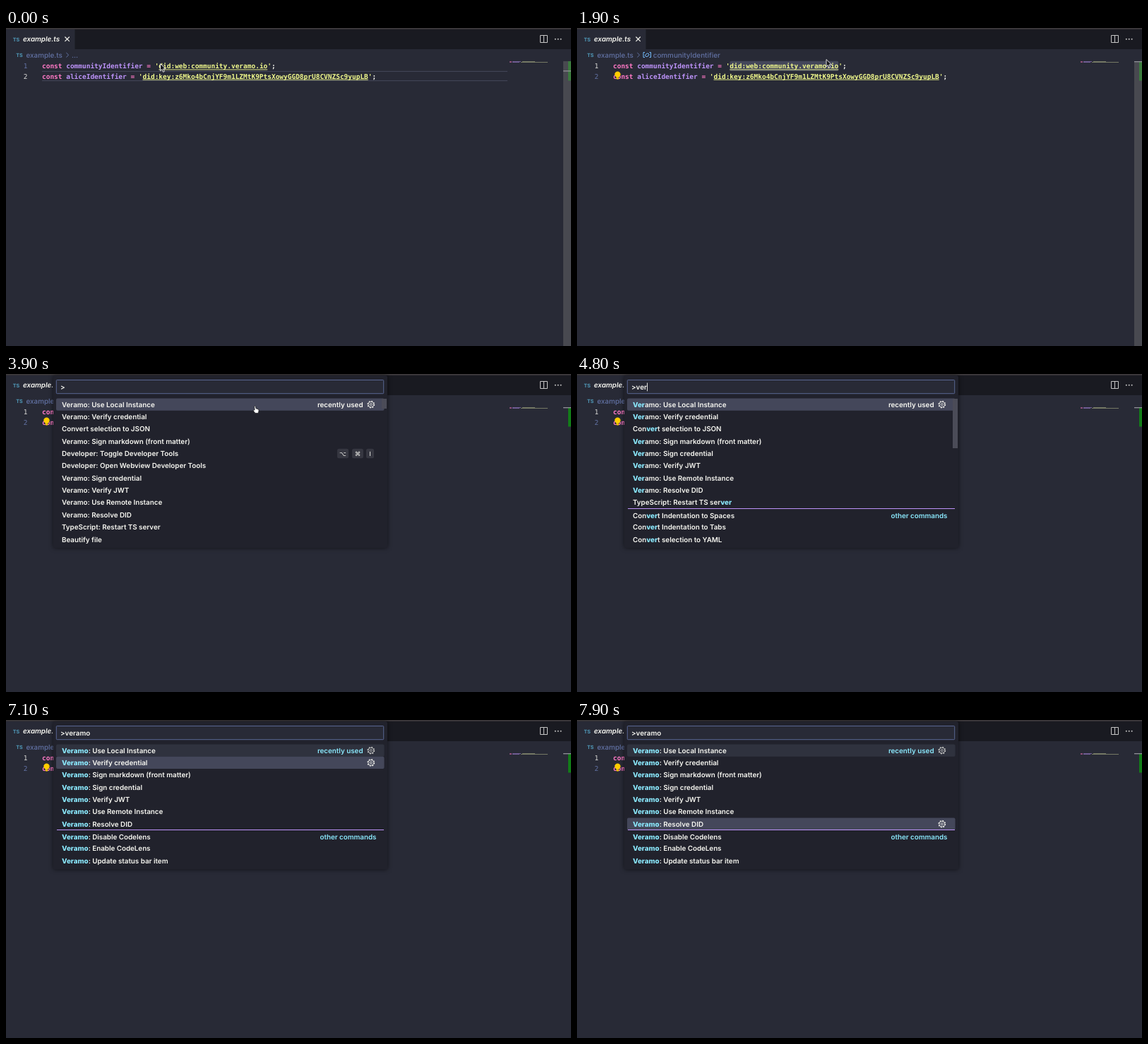
An HTML page that plays this animation: 800 by 450 pixels, repeating every 8000 ms.

```html
<!DOCTYPE html>
<html lang="en">
<head>
<meta charset="utf-8">
<title>Command palette</title>
<style>
html, body { margin: 0; width: 100%; height: 100%; overflow: hidden; background: #282a36; }
svg { display: block; width: 100vw; height: 100vh; }
text { white-space: pre; text-rendering: geometricPrecision; font: 600 9.8px Inter, sans-serif; fill: #f8f8f2; }
.code { font: 700 9.47px "DejaVu Sans Mono", monospace; }
.icon { font-weight: 700; font-size: 7.2px; fill: #519aba; }
.tab { font-style: italic; }
.dim { fill: #6272a4; font-weight: 500; font-size: 9.9px; }
.hit { fill: #8be9fd; font-weight: 800; }
.group { fill: #8be9fd; }
.keycap { font: 8.5px "DejaVu Sans", sans-serif; text-anchor: middle; }
.end { text-anchor: end; }
.line { fill: none; stroke: #f8f8f2; }
.shadow { filter: drop-shadow(0 0 3px rgba(0, 0, 0, .6)); }
</style>
</head>
<body>
<svg id="stage" viewBox="0 0 800 450"></svg>
<script>
const LOOP = 8000, STEP = 100;
const CHAR = 5.7, CODE_X = 51, LINE_H = 14.2, CODE_TOP = 46.7;
const ROW_H = 17.35, LIST_TOP = 34.4, MAX_ROWS = 12;
const OPEN = 2900, DRAG = 300;

const recent = [
  'Veramo: Use Local Instance', 'Veramo: Verify credential', 'Convert selection to JSON',
  'Veramo: Sign markdown (front matter)', 'Developer: Toggle Developer Tools',
  'Developer: Open Webview Developer Tools', 'Veramo: Sign credential', 'Veramo: Verify JWT',
  'Veramo: Use Remote Instance', 'Veramo: Resolve DID', 'TypeScript: Restart TS server', 'Beautify file'
];
const others = [
  'Convert Indentation to Spaces', 'Convert Indentation to Tabs', 'Convert selection to YAML',
  'Veramo: Disable Codelens', 'Veramo: Enable CodeLens', 'Veramo: Update status bar item'
];
const source = [
  ['communityIdentifier', 'did:web:community.veramo.io'],
  ['aliceIdentifier', 'did:key:z6Mko4bCnjYF9m1LZMtK9PtsXowyGGD8prU8CVNZSc9yupLB']
];
const query = 'veramo';
const keyTimes = [4500, 4600, 4700, 4900, 5200, 5400];
const downTimes = [7000, 7200, 7400, 7600, 7700, 7800];
const thumbHeights = [14, 20, 30, 70];
const pointerPath = [[0, 218.5, 50.5], [200, 216.5, 50.5], [DRAG, 216.5, 50.5],
  [1300, 371, 50.5], [1700, 371, 50.5], [1900, 353, 44.5]];

const escape = s => s.replace(/&/g, '&amp;').replace(/</g, '&lt;').replace(/>/g, '&gt;');
const rect = (x, y, w, h, fill, extra = '') =>
  `<rect x="${x}" y="${y}" width="${w}" height="${h}" fill="${fill}" ${extra}/>`;
const path = (d, extra = '') => `<path class="line" d="${d}" ${extra}/>`;
const text = (x, y, s, cls = '', extra = '') =>
  `<text x="${x}" y="${y}" class="${cls}" ${extra}>${escape(s)}</text>`;
const passed = (times, t) => times.filter(k => t >= k).length;
const stringStart = name => CODE_X + (name.length + 10) * CHAR;

function pointerAt(t) {
  const i = pointerPath.findIndex(p => p[0] > t);
  if (i < 0) return pointerPath.at(-1).slice(1);
  const [a, b] = [pointerPath[i - 1], pointerPath[i]];
  const k = (t - a[0]) / (b[0] - a[0]);
  return [a[1] + (b[1] - a[1]) * k, a[2] + (b[2] - a[2]) * k];
}

function header(t) {
  const symbol = t >= 1000
    ? path('M96 34.5H94V41.5H96M102.5 34.5H104.5V41.5H102.5', 'style="stroke:#75beff"') +
      path('M96.5 38.2L99.5 35.8L102 37L102 38.5L99 40.6L96.7 39.7Z', 'style="stroke:#75beff"') +
      text(107.7, 41.6, 'communityIdentifier', 'dim')
    : text(93, 41.6, '...', 'dim');
  return rect(0, 0, 800, 30, '#191a21') + rect(0, 2, 97.5, 28, '#282a36') + rect(0, 0, 800, 1.8, '#3d3a3d') +
    text(9.8, 18.6, 'TS', 'icon') + text(24, 19.4, 'example.ts', 'tab') +
    path('M83.4 12.5L89.8 18.9M89.8 12.5L83.4 18.9', 'stroke-width="1.1"') +
    path('M756.5 10.5H766.5V20.5H756.5ZM761.5 10.5V20.5', 'style="stroke:#c5c5c5"') +
    [777.8, 781.7, 785.6].map(x => `<circle cx="${x}" cy="15.7" r="1" fill="#c5c5c5"/>`).join('') +
    text(14.2, 40.8, 'TS', 'icon') + text(28.5, 41.6, 'example.ts', 'dim') +
    path('M85.3 35L88.6 38.2L85.3 41.4', 'style="stroke:#6272a4"') + symbol;
}

function codeLine([name, value], i, active) {
  const base = CODE_TOP + LINE_H * i + 10.6;
  const parts = [['#ff79c6', 'const '], ['#bd93f9', name], ['#ff79c6', ' = '], ['#e9f284', "'"],
    ['#f1fa8c', value], ['#e9f284', "'"], ['#f8f8f2', ';']];
  const spans = parts.map(([fill, s]) => `<tspan fill="${fill}">${s}</tspan>`).join('');
  return text(24.8, base, String(i + 1), 'code', `style="fill:${active ? '#d8d8d6' : '#6272a4'};font-weight:400"`) +
    `<text class="code" x="${CODE_X}" y="${base}">${spans}</text>` +
    rect(stringStart(name), base + 1.2, value.length * CHAR, 0.9, '#f1fa8c');
}

function minimap() {
  const bits = [[713, 47, 3, '#ff79c6'], [717, 47, 12, '#bd93f9'], [731, 47, 18, '#c9cf9a'],
    [713, 48.2, 3, '#ff79c6'], [717, 48.2, 10, '#bd93f9'], [729, 48.2, 38, '#c9cf9a']];
  return bits.map(([x, y, w, c]) => rect(x, y, w, 0.8, c, 'opacity=".6"')).join('');
}

function editor(t) {
  const line = t >= DRAG ? 0 : 1;
  const top = CODE_TOP + LINE_H * line;
  const [name, value] = source[0];
  const start = stringStart(name);
  const chars = t < DRAG ? 0 : Math.min(value.length, Math.round((pointerAt(Math.min(t, 1300))[0] - start) / CHAR));
  const mark = chars > 0
    ? rect(start, CODE_TOP, chars * CHAR, LINE_H, '#44475a', 'rx="2"')
    : [top, top + LINE_H - 1].map(y => rect(CODE_X, y, 659, 1, '#44475a')).join('');
  const bulb = t >= 1700
    ? '<circle cx="57.5" cy="65.6" r="4.2" fill="#ffcc00"/>' + rect(55.7, 68.5, 3.6, 4, '#ffcc00', 'rx="1"') +
      rect(55.7, 70.4, 3.6, 0.6, '#a88a20')
    : '';
  const slider = Math.max(0, Math.min(1, (2700 - t) / 800));
  return mark + source.map((s, i) => codeLine(s, i, i === line)).join('') + bulb + minimap() +
    rect(796, 47, 4, 27.5, '#127d18') +
    rect(789, 47, 11, 403, '#797979', `opacity="${0.4 * slider}"`) +
    rect(789, line ? 60.2 : 47, 11, 1.3, '#8f9096');
}

function gear(y, opacity) {
  return `<g transform="translate(516.8 ${y})" opacity="${opacity}">` +
    '<circle class="line" r="4.7" stroke-width="1.3" stroke-dasharray="1.8 1.891"/>' +
    '<circle class="line" r="3.9" stroke-width=".8"/><circle class="line" r="1.5" stroke-width=".8"/></g>';
}

function label(s, typed) {
  const at = typed ? s.toLowerCase().indexOf(typed) : 0;
  const end = at + typed.length;
  return escape(s.slice(0, at)) + `<tspan class="hit">${s.slice(at, end)}</tspan>` + escape(s.slice(end));
}

function shortcut(y) {
  return [[469, 16, '⌥'], [490, 16, '⌘'], [510, 11, 'I']].map(([x, w, s]) =>
    rect(x, y - 6.7, w, 13.4, '#363741', 'rx="2.5"') + text(x + w / 2, y + 3.1, s, 'keycap')).join('');
}

function palette(t) {
  const typed = query.slice(0, passed(keyTimes, t));
  const focus = passed(downTimes, t);
  const matches = s => s.toLowerCase().includes(typed);
  const used = recent.filter(matches);
  const rows = (typed ? used.concat(others.filter(matches)) : used).slice(0, MAX_ROWS);
  const thumb = thumbHeights[typed.length];

  const list = rows.map((s, i) => {
    const top = LIST_TOP + i * ROW_H, mid = top + ROW_H / 2;
    const firstOther = i === used.length;
    const base = mid + 3.6 + (firstOther ? 0.8 : 0);
    let out = '';
    if (i === focus || i === 0)
      out += rect(71, top, 464.5, ROW_H, i === focus ? '#44475a' : '#2f323e', 'rx="2"') + gear(mid, i === focus ? 1 : 0.8);
    out += `<text x="79" y="${base}">${label(s, typed)}</text>`;
    if (i === 0) out += text(505.5, base, 'recently used', focus ? 'end group' : 'end');
    if (firstOther)
      out += rect(72, Math.floor(top), 463, 1, '#bd93f9') + text(524.5, base, 'other commands', 'end group');
    if (s.includes('Toggle')) out += shortcut(mid);
    return out;
  }).join('');

  const blinkStart = typed ? keyTimes[typed.length - 1] : 3100;
  const caret = t < blinkStart || Math.floor((t - blinkStart) / 500) % 2 === 0;
  return rect(67, 2, 473, LIST_TOP + rows.length * ROW_H + 1.5, '#21222c', 'class="shadow" rx="3"') +
    rect(71.3, 8.5, 463.4, 19.2, '#282a36', 'stroke="#6272a4" stroke-width=".85" rx="1"') +
    text(77, 22.1, '>' + typed, '', 'id="input"') +
    (caret ? rect(0, 12.5, 0.9, 11.8, '#f8f8f2', 'id="caret"') : '') + list +
    (thumb ? rect(532, 35, 7, thumb, '#4b4c58') : '');
}

function pointer(t) {
  if (t >= keyTimes[0]) return '';
  const [x, y] = pointerAt(t);
  return t < OPEN
    ? `<path transform="translate(${x} ${y})" d="M0 0V10.2L2.4 8L4 11.8L5.8 11L4.2 7.3H7.4Z" fill="#17181d" stroke="#f4f4f4" stroke-width=".9"/>`
    : `<path transform="translate(349.5 44.8)" d="M2 1Q3-.2 3.8 1L4.5 4L8 5.2Q8.8 6 8.4 8L7.6 10.6H3.4L.6 7.2Q0 5.6 2.6 6.2Z" fill="#fff" stroke="#17181d" stroke-width=".8"/>`;
}

const stage = document.getElementById('stage');
let shown = '';

function draw(now) {
  const t = Math.floor(now % LOOP / STEP) * STEP;
  const markup = rect(0, 0, 800, 450, '#282a36') + header(t) + editor(t) + (t >= OPEN ? palette(t) : '') + pointer(t);
  if (markup !== shown) {
    stage.innerHTML = shown = markup;
    const caret = document.getElementById('caret');
    if (caret) caret.setAttribute('x', 77.2 + document.getElementById('input').getComputedTextLength());
  }
}

const began = performance.now();
function tick() {
  draw(performance.now() - began);
  requestAnimationFrame(tick);
}
tick();
</script>
</body>
</html>
```
